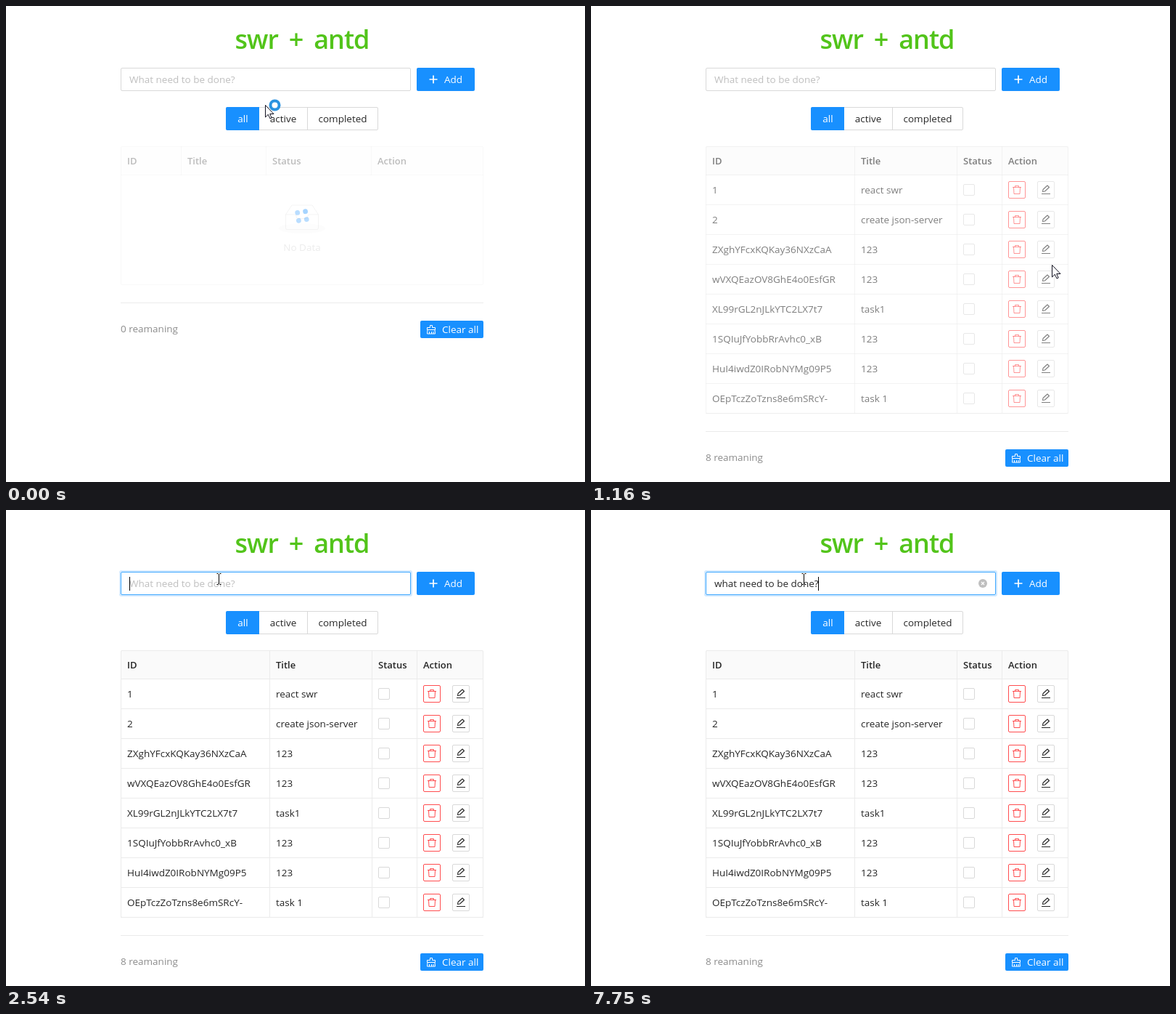
These frames come from a looping animation (798 by 655 pixels, 8000 ms). An HTML page with a canvas:

```html
<!DOCTYPE html>
<html lang="en">
<head>
<meta charset="utf-8">
<title>Todo list</title>
<style>
  html, body { margin: 0; width: 100%; height: 100%; overflow: hidden; background: #fff; }
  canvas { display: block; }
</style>
</head>
<body>
<canvas id="stage" width="798" height="655"></canvas>
<script>
const ctx = document.getElementById('stage').getContext('2d');
const LOOP = 8000, LOADED = 1090, FOCUSED = 2320;
const BLUE = '#1890ff', INK = '#262626', BORDER = '#d9d9d9', LINE = '#ebebeb', RED = '#ff4d4f';
const FONT = '"Open Sans", "Noto Sans", sans-serif';
const BODY = `13.5px ${FONT}`, BOLD = `600 13px ${FONT}`, TITLE = `600 36px ${FONT}`;

const HEADERS = ['ID', 'Title', 'Status', 'Action'];
const ROWS = [
  ['1', 'react swr'], ['2', 'create json-server'],
  ['ZXghYFcxKQKay36NXzCaA', '123'], ['wVXQEazOV8GhE4o0EsfGR', '123'],
  ['XL99rGL2nJLkYTC2LX7t7', 'task1'], ['1SQIuJfYobbRrAvhc0_xB', '123'],
  ['HuI4iwdZ0IRobNYMg09P5', '123'], ['OEpTczZoTzns8e6mSRcY-', 'task 1'],
];

// Keystrokes: time and what is typed ('<' is backspace)
const KEYS = [
  [3690, 'w'], [3770, 'h'], [3920, 'a'], [4090, 't '], [4240, 'n'], [4320, 'e'], [4470, 'e'],
  [4620, 'd'], [4700, ' '], [4940, 't'], [5020, 'o'], [5110, ' '], [5260, 'b'], [5350, 'e'],
  [5500, ' '], [5580, 'd'], [5740, 'o'], [5890, 'n'], [6280, 's'], [7200, '<'], [7290, 'e'], [7750, '?'],
];
const CARET_OFF = [[2850, 3400], [6820, 7200]];

const clamp = v => Math.max(0, Math.min(1, v));
const linear = k => k;
const easeOut = k => k * (2 - k);
const easeInOut = k => k * k * (3 - 2 * k);

// Pointer path: time, x, y, easing towards that point
const PATH = [
  [0, 357, 136], [930, 588, 243, linear], [1540, 734, 594, easeInOut],
  [1700, 541, 427, linear], [2350, 293, 95, easeOut],
];

function text(str, x, y, color = INK, font = BODY, align = 'left') {
  ctx.font = font;
  ctx.textAlign = align;
  ctx.fillStyle = color;
  ctx.fillText(str, x, y);
}

function rect(x, y, w, h, color) {
  ctx.fillStyle = color;
  ctx.fillRect(x, y, w, h);
}

function box(x, y, w, h, { fill, stroke, r = 2 }) {
  if (fill) {
    ctx.beginPath();
    ctx.roundRect(x, y, w, h, r);
    ctx.fillStyle = fill;
    ctx.fill();
  }
  if (stroke) {
    ctx.beginPath();
    ctx.roundRect(x + .5, y + .5, w - 1, h - 1, r - .5);
    ctx.strokeStyle = stroke;
    ctx.lineWidth = 1;
    ctx.stroke();
  }
}

function disc(x, y, r, color) {
  ctx.beginPath();
  ctx.arc(x, y, r, 0, 7);
  ctx.fillStyle = color;
  ctx.fill();
}

function path(d, x, y, stroke, width = 1, fill) {
  const shape = new Path2D(d);
  ctx.save();
  ctx.translate(x, y);
  ctx.lineJoin = 'round';
  if (fill) {
    ctx.fillStyle = fill;
    ctx.fill(shape);
  }
  ctx.strokeStyle = stroke;
  ctx.lineWidth = width;
  ctx.stroke(shape);
  ctx.restore();
}

function drawTitle() {
  ctx.save();
  ctx.letterSpacing = '-1px';
  ctx.wordSpacing = '6.5px';
  text('swr + antd', 408, 59, '#52c41a', TITLE, 'center');
  ctx.restore();
}

function drawInput(t) {
  const focus = clamp((t - FOCUSED) / 300);
  if (focus) {
    ctx.globalAlpha = easeOut(focus);
    box(156, 83, 404, 36, { fill: '#d1e9ff', r: 3 });
    ctx.globalAlpha = 1;
  }
  box(158, 85, 400, 32, { fill: '#fff', stroke: focus ? '#40a9ff' : BORDER });

  let value = '';
  for (const [at, key] of KEYS) {
    if (t >= at) value = key === '<' ? value.slice(0, -1) : value + key;
  }
  if (value) {
    text(value, 170, 106);
    disc(540, 101, 6, '#bfbfbf');
    path('M-2-2L2 2M2-2L-2 2', 540, 101, '#fff', 1.2);
  } else {
    text('What need to be done?', 170, 106, '#bfbfbf');
  }
  if (focus && !CARET_OFF.some(([from, to]) => t >= from && t < to)) {
    ctx.font = BODY;
    ctx.textAlign = 'left';
    rect(Math.floor(170 + ctx.measureText(value).width), 92, 1, 19, '#000');
  }
}

function drawToolbar(t) {
  drawInput(t);
  box(566, 85, 80, 32, { fill: BLUE });
  path('M-5.5 0H5.5M0-5.5V5.5', 589, 101, '#fff', 1.7);
  text('Add', 604, 106, '#fff');

  box(303, 139, 210, 32, { stroke: BORDER });
  rect(415, 139, 1, 32, BORDER);
  box(303, 139, 46, 32, { fill: BLUE, r: [2, 0, 0, 2] });
  text('all', 326.5, 160, '#fff', BODY, 'center');
  text('active', 382, 160, INK, BODY, 'center');
  text('completed', 464, 160, INK, BODY, 'center');
}

function drawGrid(columns, bottom, lineBottom) {
  rect(158, 193, 500, 40, '#fafafa');
  box(158, 193, 500, bottom - 193, { stroke: LINE });
  rect(158, 232, 500, 1, LINE);
  columns.forEach((x, i) => {
    if (i) rect(x - 9, 193, 1, lineBottom - 193, LINE);
    text(HEADERS[i], x, 218, INK, BOLD);
  });
}

function drawEmptyTable() {
  drawGrid([167, 250, 367, 512], 384, 233);
  ctx.beginPath();
  ctx.ellipse(408, 306, 32, 7, 0, 0, 7);
  ctx.fillStyle = '#f5f5f5';
  ctx.fill();
  path('M-22.5-4.5L-14-17.5H14L22.5-4.5V14Q22.5 16 20.5 16H-20.5Q-22.5 16-22.5 14Z'
    + 'M-22.5-4.5H-10Q-8-4.5-8-2Q-8 1-5 1H5Q8 1 8-2Q8-4.5 10-4.5H22.5', 408, 291.5, BORDER, 1, '#fff');
  text('No Data', 408, 337, '#bfbfbf', BODY, 'center');
}

function drawRows() {
  drawGrid([167, 372, 513, 575], 561, 561);
  ROWS.forEach(([id, title], i) => {
    const y = 253 + i * 41;
    rect(158, y + 20, 500, 1, LINE);
    text(id, 167, y + 5);
    text(title, 372, y + 5);
    box(513, y - 8, 16, 16, { stroke: BORDER });
    box(575, y - 12, 24, 24, { stroke: RED });
    path('M-6-3.5H6M-2.5-3.5V-5.5H2.5V-3.5M-4.5-3.5L-4 5.5H4L4.5-3.5', 587, y, RED);
    box(615, y - 12, 24, 24, { stroke: BORDER });
    path('M-6 5.5H6M-4.5 2.5L-4-.5L2-6L4.5-3.5L-1.5 2Z', 627, y, INK, 1.1);
  });
}

function drawSpinner(t) {
  const s = t / 1000 + .12;
  ctx.save();
  ctx.translate(408, 289);
  ctx.rotate((45 + 300 * s) * Math.PI / 180);
  [[-1, -1], [1, -1], [1, 1], [-1, 1]].forEach(([dx, dy], i) => {
    const phase = Math.max(0, s - .4 * i) % 2;
    ctx.globalAlpha = .3 + .7 * (1 - Math.abs(1 - phase));
    disc(dx * 5.5, dy * 5.5, 3.4, BLUE);
  });
  ctx.restore();
}

function drawTable(t) {
  const loaded = t >= LOADED;
  ctx.globalAlpha = .3 + .7 * easeOut(clamp((t - LOADED) / 300));
  loaded ? drawRows() : drawEmptyTable();
  ctx.globalAlpha = 1;
  if (!loaded) drawSpinner(t);
}

function drawFooter(t) {
  const count = t >= LOADED ? ROWS.length : 0;
  const y = count ? 585 : 408;
  rect(158, y, 500, 1, LINE);
  text(`${count} reamaning`, 158, y + 41, '#8c8c8c');
  box(571, y + 25, 87, 24, { fill: BLUE });
  path('M-1.5-3V-6H1.5V-3H5.5V0H-5.5V-3ZM-5 0L-5.5 5.5H5.5L5 0M-2.5 5.5V2.5M.5 5.5V2.5M3 5.5V2.5',
    586, y + 37.5, '#fff');
  text('Clear all', 601, y + 42, '#fff');
}

function drawPointer(t) {
  const next = PATH.findIndex(p => p[0] > t);
  const i = next < 0 ? PATH.length - 1 : next;
  const [t0, x0, y0] = PATH[i - 1], [t1, x1, y1, ease] = PATH[i];
  const k = ease(clamp((t - t0) / (t1 - t0)));
  const x = Math.round(x0 + (x1 - x0) * k), y = Math.round(y0 + (y1 - y0) * k);

  if (x > 158 && x < 558 && y > 85 && y < 117) {
    path('M-3-7.5H-1M1-7.5H3M-3 7.5H-1M1 7.5H3M0-7V7', x + .5, y, '#000');
    return;
  }
  path('M0 0V16.5L3.8 12.8L6.5 18.5L8.7 17.5L6.2 12H11.5Z', x + .5, y + .5, '#101020', 1, '#fff');
  if (t < 450) {
    disc(x + 13.5, y + .5, 8, '#2b93e0');
    disc(x + 13.5, y + .5, 4, '#fff');
  }
}

function frame() {
  const t = performance.now() % LOOP;
  rect(0, 0, 798, 655, '#fff');
  drawTitle();
  drawToolbar(t);
  drawTable(t);
  drawFooter(t);
  drawPointer(t);
  requestAnimationFrame(frame);
}
frame();
</script>
</body>
</html>
```
